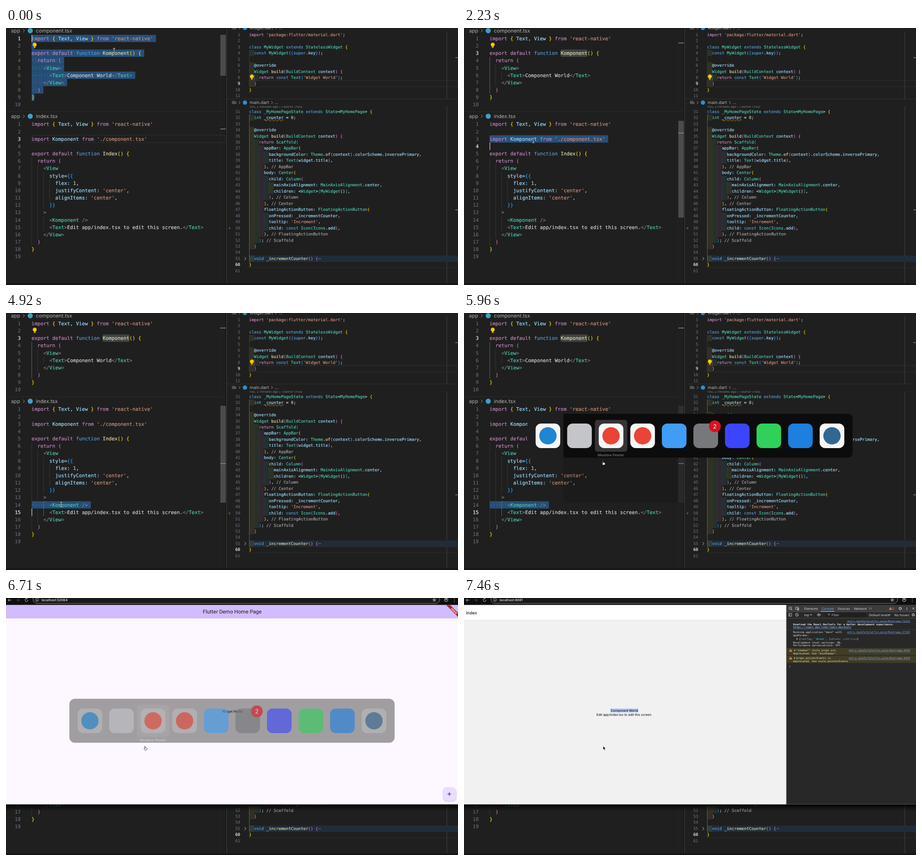
Write an HTML page that moves like this. It is 991 by 565 pixels and loops after 8000 ms.

```html
<!DOCTYPE html>
<html lang="en">
<head>
<meta charset="utf-8">
<style>
html, body { margin: 0; width: 100%; height: 100%; overflow: hidden; background: #1f1f1f; }
svg { display: block; }
text {
  white-space: pre; font-family: "DejaVu Sans Mono", monospace;
  font-variant-ligatures: none; text-rendering: geometricPrecision;
}
tspan { stroke-width: .2; }
.s { font-family: Inter, "DejaVu Sans", sans-serif; }
.r { font-family: Roboto, sans-serif; }
.b { font-weight: 700; }
.h { font-weight: 500; }
.i { font-style: italic; }
.u { text-decoration: underline; }
.mid { text-anchor: middle; }
.end { text-anchor: end; }
</style>
</head>
<body>
<svg id="stage" width="991" height="565" viewBox="0 0 991 565"></svg>
<script>
// Each "|" starts a token; the letter after it picks the colour.
const COLORS = {
  p: '#c586c0', b: '#569cd6', s: '#ce9178', c: '#4ec9b0', f: '#dcdcaa', v: '#9cdcfe', t: '#d4d4d4',
  y: '#ffd700', o: '#da70d6', l: '#179fff', g: '#808080', n: '#b5cea8', m: '#a6a6a6'
};

const componentSrc = `|pimport |y{ |vText|t, |vView |y} |pfrom |s'react-native'

|pexport default |bfunction |fKomponent|y() {
  |preturn |o(
    |g<|cView|g>
      |g<|cText|g>|tComponent World|g</|cText|g>
    |g</|cView|g>
  |o)
|y}
`;
const indexSrc = `|pimport |y{ |vText|t, |vView |y} |pfrom |s'react-native'

|pimport |vKomponent |pfrom |s'./component.tsx'

|pexport default |bfunction |fIndex|y() {
  |preturn |o(
    |g<|cView
      |vstyle|t=|l{{
        |vflex: |n1|t,
        |vjustifyContent: |s'center'|t,
        |valignItems: |s'center'|t,
      |l}}
    |g>
      |g<|cKomponent |g/>
      |g<|cText|g>|tEdit app/index.tsx to edit this screen.|g</|cText|g>
    |g</|cView|g>
  |o)
|y}
`;
const widgetSrc = `|pimport |s'package:flutter/material.dart'|t;

|bclass |cMyWidget |bextends |cStatelessWidget |y{
  |bconst |cMyWidget|o(|l{|bsuper|t.|vkey|l}|o)|t;

  |v@override
  |cWidget |fbuild|o(|cBuildContext |vcontext|o) {
    |preturn |bconst |cText|l(|s'Widget World'|l)|t;
  |o}
|y}
`;
const mainSrc = `|bclass |c_MyHomePageState |bextends |cState|t<|cMyHomePage|t> |y{
  |cint |v_counter |t= |n0|t;

  |v@override
  |cWidget |fbuild|o(|cBuildContext |vcontext|o) {
    |preturn |cScaffold|l(
      |vappBar: |cAppBar|y(
        |vbackgroundColor: |cTheme|t.|fof|o(|vcontext|o)|t.|vcolorScheme|t.|vinversePrimary|t,
        |vtitle: |cText|o(|vwidget|t.|vtitle|o)|t,
      |y)|t, |m// AppBar
      |vbody: |cCenter|y(
        |vchild: |cColumn|o(
          |vmainAxisAlignment: |cMainAxisAlignment|t.|vcenter|t,
          |vchildren: |t<|cWidget|t>|l[|cMyWidget|y()|l]|t,
        |o)|t, |m// Column
      |y)|t, |m// Center
      |vfloatingActionButton: |cFloatingActionButton|y(
        |vonPressed: |v_incrementCounter|t,
        |vtooltip: |s'Increment'|t,
        |vchild: |bconst |cIcon|o(|cIcons|t.|vadd|o)|t,
      |y)|t, |m// FloatingActionButton
    |l)|t; |m// Scaffold
  |o}

  |bvoid |f_incrementCounter|o() {
|y}
`;

const esc = s => s.replace(/&/g, '&amp;').replace(/</g, '&lt;');
const rect = (x, y, w, h, fill, extra = '') =>
  `<rect x="${x}" y="${y}" width="${w}" height="${h}" fill="${fill}" ${extra}/>`;
const path = (d, stroke, width = 1, fill = 'none') =>
  `<path d="${d}" stroke="${stroke}" stroke-width="${width}" fill="${fill}"/>`;
const circle = (x, y, r, fill, extra = '') => `<circle cx="${x}" cy="${y}" r="${r}" fill="${fill}" ${extra}/>`;
const raw = (x, y, body, size, fill, cls = '') =>
  `<text x="${x}" y="${(y + size * .36).toFixed(2)}" font-size="${size}" fill="${fill}" class="${cls}">${body}</text>`;
const text = (x, y, s, size, fill, cls) => raw(x, y, esc(s), size, fill, cls);

function editor(src, side, top, first = 1) {
  const lines = src.split('\n');
  const plain = lines.map(l => l.replace(/\|./g, ''));
  return { ...side, lines, plain, top, first, cw: side.size * .602 };
}
const left = { x: 56, numX: 32.3, size: 10.8, pitch: 16.17 };
const right = { x: 533, numX: 513.5, size: 8.98, pitch: 13.47, rainbow: true };
const comp = editor(componentSrc, left, 23);
const index = editor(indexSrc, left, 211.5);
const widget = editor(widgetSrc, right, 14.5);
const main = editor(mainSrc, right, 183.4, 31);
const editors = [comp, index, widget, main];

const rowY = (ed, line) => ed.top + (line - ed.first) * ed.pitch;
const rowTop = (ed, line) => rowY(ed, line) - ed.pitch / 2;
const label = (ed, i) => ed === main && i > 24 ? i + 35 : i + ed.first;
const block = (ed, line, from, to, fill) =>
  rect(ed.x + from * ed.cw, rowTop(ed, line), (to - from) * ed.cw, ed.pitch, fill, 'rx="2"');
const caret = (ed, line, col) => rect(ed.x + col * ed.cw, rowTop(ed, line), 1.3, ed.pitch, '#d0d0d0');
const guide = (ed, col, from, to, color) =>
  rect(ed.x + col * ed.cw, rowTop(ed, from), .8, (to - from + 1) * ed.pitch, color);
const activeGuide = (ed, col, from, to) => guide(ed, col, from, to, '#707070');
const activeNum = (ed, line, shown = line) => text(ed.numX, rowY(ed, line), '' + shown, ed.size, '#fff', 'end');
const lineFrame = (ed, line, w) => rect(ed.x, rowTop(ed, line), w, ed.pitch, 'none', 'stroke="#303030"');

function guides(ed) {
  const rainbow = ['#ffff40', '#7fff7f', '#ff7fff', '#4fecec'];
  const lead = l => l.length - l.trimStart().length;
  return ed.plain.map((s, i) => {
    const line = ed.first + i;
    let out = '';
    for (let k = 0; k < lead(s || ed.plain[i + 1] || ''); k += 2) {
      if (ed.rainbow && s) {
        out += rect(ed.x + k * ed.cw, rowTop(ed, line), 2 * ed.cw, ed.pitch, rainbow[k / 2 % 4], 'opacity=".08"');
      }
      out += guide(ed, k, line, line, '#3c3c3c');
    }
    return out;
  }).join('');
}
function code(ed) {
  return ed.lines.map((line, i) => {
    const y = ed.top + i * ed.pitch;
    const [lead, ...tokens] = line.split('|');
    const body = tokens.map(t => {
      const color = COLORS[t[0]];
      return `<tspan fill="${color}" stroke="${color}">${esc(t.slice(1))}</tspan>`;
    }).join('');
    return text(ed.numX, y, '' + label(ed, i), ed.size, '#6e7681', 'end') +
      raw(ed.x + lead.length * ed.cw, y, body, ed.size, '#d4d4d4');
  }).join('');
}
const chevron = (x, y, s, color = '#a0a0a0') => path(`M${x - s / 2},${y - s}l${s},${s}l${-s},${s}`, color);
const bulb = (x, y) => circle(x, y - 1.5, 4.3, '#ffcc00') + rect(x - 2, y + 2.3, 4, 3.4, '#d9a800', 'rx="1"');

function crumbs(x, y, size, dir, gap, file, dot) {
  return text(x, y, dir, size, '#a9a9a9', 's') + chevron(x + gap, y, size * .3) +
    circle(x + gap + size * 1.25, y, size * .5, dot) + text(x + gap + size * 2.35, y, file, size, '#b4b4b4', 's');
}

function backdrop() {
  let squiggle = 'M565,203';
  for (let i = 0; i < 11; i++) squiggle += `l2,${i % 2 ? 2 : -2}l2,${i % 2 ? -2 : 2}`;
  return {
    below: rect(0, 0, 991, 565, '#1f1f1f') + rect(0, 183.5, 481, 1, '#2d2d2d') + rect(484, 155.5, 507, 1, '#333') +
      rect(481, 0, 2, 565, '#151515') + rect(483, 0, 1, 565, '#484848') +
      rect(469.5, 15, .7, 168, '#292929') + rect(469.5, 204, .7, 357, '#292929') +
      rect(966, 8, .8, 148, '#4a4a4a') + rect(966, 172, .8, 390, '#4a4a4a') +
      rect(533, 500.2, 458, 13.4, '#202c39') + lineFrame(widget, 9, 458) + lineFrame(main, 56, 458),
    above: editors.map(guides).join('') + activeGuide(widget, 2, 8, 8) + activeGuide(main, 0, 32, 55) +
      text(533, 172, 'You, 2 minutes ago | 1 author (You)', 7.1, '#8a8a8a', 's') +
      rect(484, 157, 482, 14.5, '#1f1f1f') + editors.map(code).join('') +
      crumbs(11, 6, 11.3, 'app', 28, 'component.tsx', '#3f9fc4') + crumbs(11, 194, 11.3, 'app', 28, 'index.tsx', '#3f9fc4') +
      crumbs(495, 0, 9.5, 'lib', 17, 'widget.dart', '#2c8fd1') + crumbs(495, 164, 9.5, 'lib', 17, 'main.dart', '#2c8fd1') +
      chevron(592, 0, 3) + text(598, 0, '...', 9.5, '#b4b4b4', 's') +
      chevron(583, 164, 3) + text(589, 164, '...', 9.5, '#b4b4b4', 's') +
      bulb(63, 38) + bulb(539, 108) + chevron(524.5, 507, 3.5, '#c5c5c5') +
      text(490, 440, '+', 9, '#888', 'mid') + text(685, 506.5, '⋯', 9, '#999') +
      path(squiggle, '#cca700', .8) + activeNum(widget, 9) + activeNum(main, 56, 60) +
      rect(985, 64.5, 6, 1.3, '#888') + rect(985, 399, 6, 1.3, '#888') + rect(0, 561, 991, 4, '#191516')
  };
}

// Selections sit below the code, carets and scrollbars above it.
function editorState(t) {
  const BLUE = '#264f78', WORD = '#505c69', SAME = '#404343';
  let low = '', high = '';
  const dots = (ed, line) => text(ed.x, rowY(ed, line),
    [...ed.plain[line - 1]].map(c => c === ' ' ? '·' : ' ').join(''), ed.size, '#54738f');
  const fullLine = (ed, line) => {
    low += block(ed, line, 0, ed.plain[line - 1].length + (ed === comp && line === 9 ? 0 : 1), BLUE);
    high += dots(ed, line);
  };
  const mark = (y, h = 1.5) => high += rect(470, y - h / 2, 12, h, '#8b8b8b');
  const slider = (y, h, a) => low += rect(470, y, 12, h, '#fff', `opacity="${a}"`);

  if (t < 150) {
    for (let n = 1; n < 10; n++) fullLine(comp, n);
    high += caret(comp, 1, 0) + activeNum(comp, 1);
  } else {
    high += activeGuide(comp, 0, 4, 8) + activeNum(comp, 3);
    if (t < 440) {
      low += lineFrame(comp, 3, 425);
      high += caret(comp, 3, 28);
    } else {
      low += block(comp, 3, 24, 33, t < 1930 ? WORD : SAME);
      if (t < 1930) high += caret(comp, 3, 33);
      if (t < 1190) high += rect(473, 33, 6, 8, '#8b9095');
      mark(33);
    }
  }
  if (t < 1930) slider(15, 90, .2 * Math.max(0, Math.min(1, (1640 - t) / 450)));

  const words = (line, other) => {
    low += block(index, line, 7, 16, WORD) + block(index, other, 7, 16, SAME);
    high += caret(index, line, 16);
  };
  let num = 3;
  if (t < 1930) low += lineFrame(index, 3, 425);
  else if (t < 2080) words(3, 14);
  else if (t < 3730) {
    num = 4;
    fullLine(index, 3);
    if (t < 2530 || t >= 2980 && t < 3430) high += caret(index, 4, 0);
  } else if (t < 3880) {
    num = 14;
    words(14, 3);
  } else {
    num = 15;
    fullLine(index, 14);
    if (t < 4480 || t >= 4920 && t < 5370) high += caret(index, 15, 0);
  }
  if (num > 4) high += activeGuide(index, 4, 14, 15);
  high += activeNum(index, num);
  mark(num === 3 ? 222 : num === 4 ? 231 : 331);
  if (t >= 1340) slider(204, 213, t < 5960 ? .2 : .07);
  return [low, high];
}

function switcher(fading) {
  const apps = [['white', '#1f86d2'], ['#c4c5c9'], ['white', '#e94435'], ['white', '#e94435'], ['#3f9df5'],
    ['#77787c'], ['#3b45fd'], ['#2fd15a'], ['#1d7fe0'], ['white', '#336791']];
  const icons = apps.map(([tile, dot], i) => {
    const x = 184 + i * 69.2;
    return rect(x - 27, 243, 54, 54, tile === 'white' ? (fading ? '#bbb' : '#f7f7f7') : tile, 'rx="12"') +
      (dot ? circle(x, 270, 19, dot) : '');
  }).join('');
  const panel = fading
    ? rect(139, 221.5, 713, 96.8, '#0c0c0c', 'rx="12" opacity=".38"')
    : rect(218, 318, 263, 99, '#000', 'opacity=".12"') + rect(139, 222, 100, 96, '#1f1f1f') +
      `<path d="M218,221.5H840q12,0 12,12V306q0,12 -12,12H218z" fill="#0c0c0c"/>`;
  return panel + rect(287, 235, 71, 70, '#fff', `rx="6" opacity="${fading ? .06 : .17}"`) +
    `<g opacity="${fading ? .6 : 1}">${icons}${circle(550, 249, 13, '#d9121f')}` +
    text(550, 249, '2', 13, '#fff', 's mid') + '</g>' +
    text(322, 312, 'Meadow Pewter', 7.6, fading ? '#d0ccd0' : '#8c8c8c', 's mid');
}

function browser(address, page) {
  const icon = (x, s, color = '#ddd', size = 10) => text(x, 4, s, size, color, 's mid');
  return `<defs><linearGradient id="shade" x2="0" y2="1"><stop stop-opacity=".85"/><stop offset="1" stop-opacity="0"/></linearGradient></defs>` +
    rect(0, 454, 991, 14, 'url(#shade)') + rect(0, 0, 991, 454, '#0f0f0f') +
    rect(59, -6, 892, 18, '#191919', 'rx="9" stroke="#8b8b8b"') +
    icon(8, '←') + icon(26, '→', '#5c5c5c') + icon(45, '↻') + icon(939, '☆') +
    circle(68, 4, 3.3, 'none', 'stroke="#ccc" stroke-width=".8"') + rect(67.6, 3.5, .9, 2.5, '#ccc') +
    circle(965, 4, 3.8, 'none', 'stroke="#ddd"') + circle(965, 3, 1.4, '#ddd') + icon(983, '⋮') +
    text(78, 4, address, 7.3, '#eee', 's h') + page;
}

function flutterPage() {
  return rect(0, 15.5, 991, 438.2, '#fdf8ff') + rect(0, 15.5, 991, 29.5, '#d3bcfd') +
    text(496, 30.3, 'Flutter Demo Home Page', 11.5, '#1d1b20', 'r mid') +
    '<path d="M965,15.5h9l17,17v9z" fill="#a52a2f"/>' +
    `<g transform="translate(982.3 28.5) rotate(45)">${text(0, 0, 'DEBUG', 5.3, '#fff', 'r b mid')}</g>` +
    text(496, 249.5, 'Widget World', 7.4, '#1d1b20', 'r mid') +
    rect(957, 418, 31, 30, '#000', 'rx="9" opacity=".14"') + rect(957, 416, 30, 30, '#eaddff', 'rx="8.5"') +
    path('M968,431h8M972,427v8', '#21005d', 1.1);
}

function nativePage() {
  const LINK = '#7cacf8', TEXT = '#e3e3e3', WARN = '#f5e3b0';
  const ui = (x, y, s, color = '#d5d5d5', cls = 's') => text(x, y, s, 7, color, cls);
  const log = (x, y, s, color = TEXT, cls = '') => text(x, y, s, 5.72, color, cls);
  const source = (y, n) => log(978, y, 'entry.bundle?platfor…outerRoot=app:' + n, LINK, 'u end');
  const fold = (x, y) => `<path d="M${x},${y - 2}l3,2l-3,2z" fill="#bbb"/>`;
  const drop = (x, y) => `<path d="M${x},${y - 1}h4l-2,2.5z" fill="#ccc"/>`;
  const alert = (x, y) => `<path d="M${x},${y - 3.2}l3.5,6h-7z" fill="#f28b54"/>` + rect(x - .4, y - 1, .8, 2, '#282828');
  const gear = (x, y) => circle(x, y, 2.6, 'none', 'stroke="#ccc" stroke-width="1.6" stroke-dasharray="1.3 .75"') +
    circle(x, y, 2.2, 'none', 'stroke="#ccc" stroke-width=".8"');
  return rect(0, 15.5, 707, 438.2, '#f1f1f1') + rect(0, 15.5, 707, 33.5, '#fff') + rect(0, 48.6, 707, .8, '#d8d8d8') +
    text(4.5, 33, 'index', 9.3, '#1c1c1e', 's h') + rect(321, 243, 61, 8.5, '#b1c7f3') +
    text(351.5, 247.3, 'Component World', 7, '#000', 's mid') +
    text(351.5, 256.4, 'Edit app/index.tsx to edit this screen.', 7, '#000', 's mid') +
    rect(707, 15, 284, 439, '#282828') + rect(707, 15, 284, 15, '#3c3c3c') + rect(706.5, 15, 1, 439, '#484848') +
    rect(707, 30, 284, .7, '#5e5e5e') + rect(707, 44, 284, .7, '#5e5e5e') +
    path('M713,20h5v5h-5zM716,23l4,4', '#ccc', .9) + path('M727,20h6v5h-6zM731,22h3v5h-3z', '#ccc', .9) +
    ui(746, 23, 'Elements') + ui(784, 23, 'Console', LINK) + rect(782, 28.6, 30, 1.4, LINK) +
    ui(819, 23, 'Sources') + ui(855, 23, 'Network') + chevron(889, 23, 2.5) + chevron(892.5, 23, 2.5) +
    alert(935, 23) + ui(939, 23, '2', '#f28b54') + gear(956.5, 23) + ui(971, 23, '⋮', '#ddd', 's b mid') +
    path('M983,21l4.5,4.5M987.5,21l-4.5,4.5', '#ddd', .9) +
    path('M712,34h6.5v6h-6.5zM714,34v6', '#ccc', .9) + circle(730, 37, 3.2, 'none', 'stroke="#ccc" stroke-width=".9"') +
    path('M727.8,34.8l4.4,4.4', '#ccc', .9) + ui(746, 37, 'top') + drop(759, 37) +
    path('M774,37q4,-5 8,0q-4,5 -8,0z', '#ccc', .9) + circle(778, 37, 1.2, '#ccc') +
    rect(792, 32, 91, 10.5, '#202020', 'rx="5"') + path('M797.5,35h5M798.5,37h3M799.4,39h1.2', '#bbb', .8) +
    ui(806, 37, 'Filter', '#bbb') + ui(888, 37, 'Default levels') + drop(931, 37) + ui(943.5, 37, 'No Issues') + gear(985, 37) +
    source(50.5, 72231) + log(721.5, 57.5, 'Download the React DevTools for a better development experience:', TEXT, 'b') +
    log(721.5, 64, 'https://react.dev/link/react-devtools', LINK, 'b u') + rect(707, 69.3, 284, .7, '#444') +
    source(75.3, 37103) + log(721.5, 75.3, 'Running application "main" with') + log(721.5, 82, 'appParams:') +
    fold(729, 90) + raw(734.5, 89.8, `{<tspan fill="#9a9a9a">rootTag: </tspan><tspan fill="#5cd5fb">'#root'</tspan>, ` +
      '<tspan fill="#9a9a9a">hydrate: </tspan><tspan fill="#7d7d7d">undefined</tspan>}', 5.72, TEXT, 'i') +
    log(721.5, 97.5, 'Development-level warnings: ON.') + log(721.5, 104, 'Performance optimizations: OFF.') +
    rect(707, 110, 284, 15.5, '#413c26') + rect(707, 127, 284, 15.7, '#413c26') +
    alert(716, 115) + fold(724, 115) + log(728.5, 115, '"shadow*" style props are', WARN) + source(115, 9434) +
    log(721.5, 122, 'deprecated. Use "boxShadow".', WARN) +
    alert(716, 132) + fold(724, 132) + log(728.5, 132, 'props.pointerEvents is', WARN) + source(132, 9434) +
    log(721.5, 139, 'deprecated. Use style.pointerEvents', WARN) + chevron(714.5, 150.5, 2, LINK) +
    rect(707, 453, 284, 1, '#555');
}

const POINTER = [[0, 237, 50], [150, 237, 50], [590, 238, 56], [740, 238, 56], [890, 222, 66], [1790, 152, 247],
  [2680, 152, 247], [3580, 121, 421], [5070, 121, 421], [5515, 305.5, 330], [8000, 305.5, 330]];
const STEP = 149.1;

function pointer(t) {
  const q = Math.floor((t + 8) / STEP) * STEP;
  const i = Math.max(1, POINTER.findIndex(k => k[0] > q));
  const [a, b] = [POINTER[i - 1], POINTER[i]];
  const u = (q - a[0]) / (b[0] - a[0]), e = u * u * (3 - 2 * u);
  const x = a[1] + (b[1] - a[1]) * e, y = a[2] + (b[2] - a[2]) * e;
  let shape;
  if (t < 5960) {
    const beam = 'M-2.5,-5.5q2.5,0 2.5,1.5v8q0,1.5 -2.5,1.5M2.5,-5.5q-2.5,0 -2.5,1.5M0,4q0,1.5 2.5,1.5';
    shape = path(beam, '#222', 2.4) + path(beam, '#eee', 1);
  } else if (t < 7460) {
    shape = path('M-1.8,-3.5q1,-1 1.6,.3l.6,2l2.6,.7q1,.4 .8,1.6l-.6,3h-4l-2.4,-3q0,-1 1.4,-.4l1,.6z', '#222', .8, '#fff');
  } else {
    shape = path('M-.5,-4.5v8.2l2,-1.8l1.3,3l1.4,-.6l-1.3,-2.9h2.6z', '#fff', .7, '#000');
  }
  return `<g transform="translate(${x.toFixed(1)} ${y.toFixed(1)})">${shape}</g>`;
}

const stage = document.getElementById('stage');
const { below, above } = backdrop();
stage.innerHTML = `<g>${below}</g><g id="low"></g><g>${above}</g><g id="high"></g><g id="cover"></g><g id="mouse"></g>`;

const covers = [
  [7460, browser('localhost:8081', nativePage())],
  [6860, browser('localhost:52064', flutterPage())],
  [6710, browser('localhost:52064', flutterPage()) + switcher(true)],
  [5960, switcher(false)],
  [0, '']
];
const shown = {};
function put(id, markup) {
  if (shown[id] === markup) return;
  shown[id] = markup;
  document.getElementById(id).innerHTML = markup;
}
function draw() {
  const t = performance.now() % 8000;
  const [low, high] = editorState(t);
  put('low', low);
  put('high', high);
  put('cover', covers.find(c => t >= c[0])[1]);
  put('mouse', pointer(t));
  requestAnimationFrame(draw);
}
draw();
</script>
</body>
</html>
```
